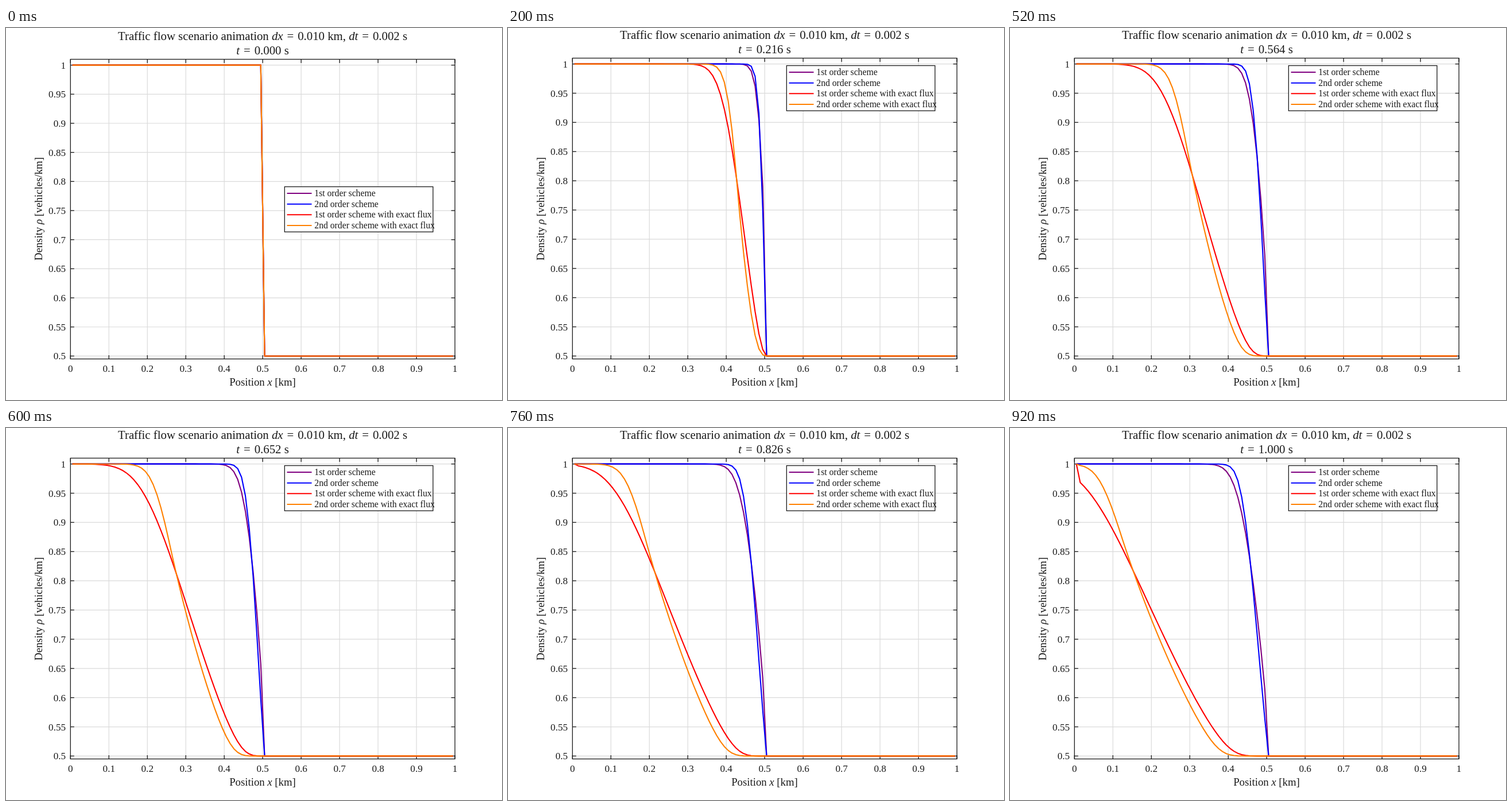
An HTML page with a canvas that plays this animation: 864 px wide and 648 px high, repeating every 0.96 s.

```html
<!DOCTYPE html>
<html lang="en">
<head>
<meta charset="utf-8">
<title>Traffic flow</title>
<style>
html, body { margin: 0; width: 100%; height: 100%; overflow: hidden; background: #fff; }
canvas { display: block; }
</style>
</head>
<body>
<canvas id="stage" width="864" height="648"></canvas>
<script>
const ctx = document.getElementById('stage').getContext('2d');
const LEFT = 112.3, RIGHT = 782, BOTTOM = 576.5;
const CELLS = 100, DX = 0.01, DT = 0.002, STEPS = 500, FRAMES = 24, FRAME_MS = 40;
const INK = '#1a1a1a', SERIF = '"Liberation Serif", "Times New Roman", serif';

const parabolic = r => r * (1 - r) / 15;
const logarithmic = r => -r * Math.log10(r);
const schemes = [
  { name: '1st order scheme', color: '#800080', flux: parabolic, order: 1 },
  { name: '2nd order scheme', color: '#0000ff', flux: parabolic, order: 2 },
  { name: '1st order scheme with exact flux', color: '#ff0000', flux: logarithmic, order: 1 },
  { name: '2nd order scheme with exact flux', color: '#ff8000', flux: logarithmic, order: 2 }
];

const stepAt = frame => Math.floor(frame * STEPS / (FRAMES - 1));
const minmod = (a, b) => a * b <= 0 ? 0 : Math.abs(a) < Math.abs(b) ? a : b;

// All waves travel left, so each face takes its flux from the cell on its right.
function advance(rho, { flux, order }) {
  const last = CELLS - 1;
  const faceFlux = rho.map((r, i) => {
    const inner = order === 2 && i > 0 && i < last;
    const slope = inner ? minmod(r - rho[i - 1], rho[i + 1] - r) : 0;
    return flux(r - slope / 2);
  });
  return rho.map((r, i) =>
    i === 0 || i === last ? r : r - DT / DX * (faceFlux[i + 1] - faceFlux[i]));
}

function simulate(scheme) {
  let rho = Array.from({ length: CELLS }, (_, i) => i < CELLS / 2 ? 1 : 0.5);
  const snapshots = [];
  for (let step = 0; step <= STEPS; step++) {
    if (step === stepAt(snapshots.length)) snapshots.push(rho);
    rho = advance(rho, scheme);
  }
  return snapshots;
}
for (const scheme of schemes) scheme.snapshots = simulate(scheme);

function polyline(points, color, width) {
  ctx.beginPath();
  for (const [x, y] of points) ctx.lineTo(x, y);
  ctx.strokeStyle = color;
  ctx.lineWidth = width;
  ctx.stroke();
}

// Draws text in which *starred* parts are italic.
function label(text, x, y, size, align = 0.5) {
  const runs = text.split('*').map((part, i) => {
    const font = `${i % 2 ? 'italic ' : ''}${size}px ${SERIF}`;
    ctx.font = font;
    return { part, font, width: ctx.measureText(part).width };
  });
  x -= align * runs.reduce((sum, run) => sum + run.width, 0);
  ctx.fillStyle = INK;
  for (const { part, font, width } of runs) {
    ctx.font = font;
    ctx.fillText(part, x, y);
    x += width;
  }
}

const xAt = x => LEFT + x * (RIGHT - LEFT);

function drawAxes(top, yAt) {
  const xs = Array.from({ length: 11 }, (_, i) => i / 10);
  const ys = xs.map(x => 0.5 + x / 2);
  const tick = 6.5;
  for (const x of xs.slice(1, -1)) polyline([[xAt(x), top], [xAt(x), BOTTOM]], '#dadada', 1.2);
  for (const y of ys) polyline([[LEFT, yAt(y)], [RIGHT, yAt(y)]], '#dadada', 1.2);
  for (const x of xs) {
    const px = xAt(x);
    polyline([[px, BOTTOM], [px, BOTTOM - tick]], INK, 1.3);
    polyline([[px, top], [px, top + tick]], INK, 1.3);
    label(String(x), px, 599.2, 17.1);
  }
  for (const y of ys) {
    const py = yAt(y);
    polyline([[LEFT, py], [LEFT + tick, py]], INK, 1.3);
    polyline([[RIGHT, py], [RIGHT - tick, py]], INK, 1.3);
    label(String(+y.toFixed(2)), 104, py + 6, 17.1, 1);
  }
  ctx.strokeRect(LEFT, top, RIGHT - LEFT, BOTTOM - top);
  label('Position *x* [km]', 447, 623, 18.75);
  ctx.save();
  ctx.translate(63, 315);
  ctx.rotate(-Math.PI / 2);
  label('Density *ρ* [vehicles/km]', 0, 0, 18.75);
  ctx.restore();
}

function drawLegend(top) {
  ctx.fillStyle = '#fff';
  ctx.fillRect(485.3, top, 258.5, 78.7);
  ctx.strokeStyle = INK;
  ctx.lineWidth = 1.3;
  ctx.strokeRect(485.3, top, 258.5, 78.7);
  schemes.forEach(({ name, color }, i) => {
    const y = top + 11.6 + i * 18.6;
    polyline([[489.5, y], [532.5, y]], color, 2);
    label(name, 537.3, y + 5, 15.7, 0);
  });
}

function draw(frame) {
  const shift = frame === 0 ? 2 : 0;
  const top = 52.5 + shift;
  const yAt = rho => BOTTOM - (rho - 0.495) / 0.515 * (BOTTOM - top);
  const time = (stepAt(frame) * DT).toFixed(3);
  ctx.fillStyle = '#fff';
  ctx.fillRect(0, 0, 864, 648);
  label('Traffic flow scenario animation *dx*\u2004=\u20040.010 km, *dt*\u2004=\u20040.002 s', 447, 19 + shift, 20.8);
  label(`*t*\u2004=\u2004${time} s`, 447, 44 + shift, 20.8);
  drawAxes(top, yAt);
  ctx.lineJoin = 'round';
  for (const { snapshots, color } of schemes) {
    polyline(snapshots[frame].map((rho, i) => [xAt((i + 0.5) * DX), yAt(rho)]), color, 2.1);
  }
  ctx.lineJoin = 'miter';
  drawLegend(frame === 0 ? 276.5 : 65.5);
}

const start = performance.now();
let shown = -1;
function play() {
  const frame = Math.floor((performance.now() - start) / FRAME_MS) % FRAMES;
  if (frame !== shown) draw(shown = frame);
  requestAnimationFrame(play);
}
play();
</script>
</body>
</html>
```
